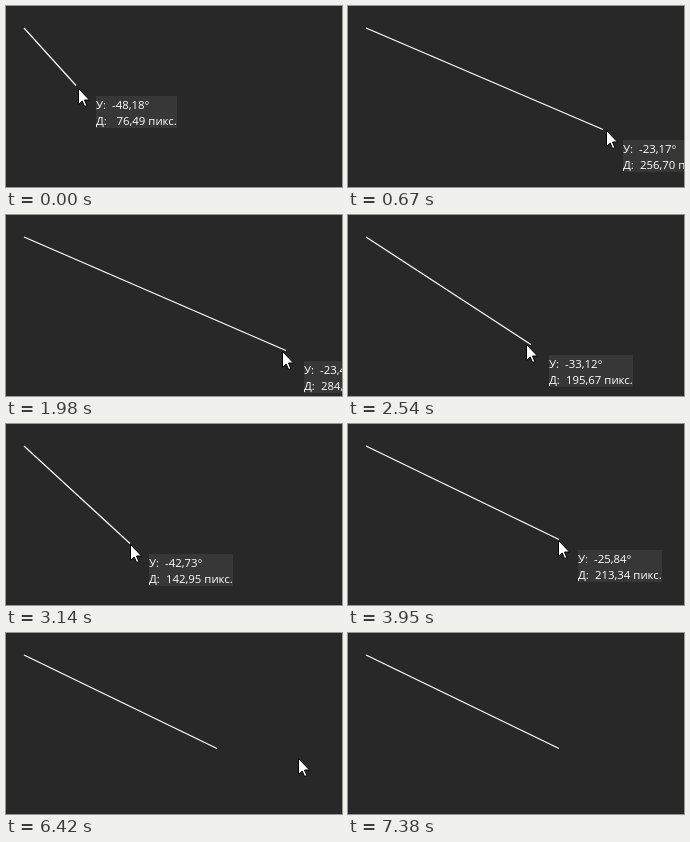
These frames come from a looping animation (336 by 181 pixels, 8120 ms). An HTML page with a canvas:

```html
<!DOCTYPE html>
<html lang="ru">
<head>
<meta charset="utf-8">
<title>Линия</title>
<style>
html, body { margin: 0; width: 100%; height: 100%; overflow: hidden; background: #282828; }
canvas { display: block; }
</style>
</head>
<body>
<canvas id="stage" width="336" height="181"></canvas>
<script>
const ctx = document.getElementById('stage').getContext('2d');
const LOOP = 8120, REFRESH = 50, RELEASE = 4050;
const POINTER_LEAD = 23; // ms by which the pointer runs ahead of the line

// Turning points of the drag; the curve between them is a cubic spline.
const drag = [
  { t: 0, angle: 48.18, length: 76.49 },
  { t: 650, angle: 23.17, length: 256.7 },
  { t: 1300, angle: 23.8, length: 310 },
  { t: 1950, angle: 23.43, length: 284.36 },
  { t: 2550, angle: 34, length: 189 },
  { t: 3100, angle: 42.73, length: 142.95 },
  { t: 3950, angle: 25.84, length: 213.34 }
];

// Moves of the free pointer after the drag.
const glides = [
  { from: RELEASE, to: 4200, x: 205, y: 107 },
  { from: 4600, to: 5300, x: 294, y: 125 },
  { from: 6390, to: 6400, x: 292, y: 125 },
  { from: 7100, to: 7350, x: 322, y: 182 }
];

const clamp = (v, lo, hi) => Math.min(hi, Math.max(lo, v));
const smooth = u => u * u * (3 - 2 * u);

function spline(keys, name, time) {
  const last = keys.length - 1;
  const t = clamp(time, keys[0].t, keys[last].t);
  const i = clamp(keys.findIndex(k => k.t > t) - 1, -2, last - 1);
  if (i < 0) return keys[last][name];
  const a = keys[i], b = keys[i + 1], span = b.t - a.t, u = (t - a.t) / span;
  const tangent = n => {
    const p = keys[Math.max(n - 1, 0)], q = keys[Math.min(n + 1, last)];
    const weight = n === 0 || n === last ? 0.5 : 1;
    return weight * (q[name] - p[name]) / (q.t - p.t);
  };
  return a[name] + (b[name] - a[name]) * smooth(u)
    + span * u * (1 - u) * ((1 - u) * tangent(i) - u * tangent(i + 1));
}

function lineAt(t) {
  const angle = spline(drag, 'angle', t), length = spline(drag, 'length', t);
  const rad = angle * Math.PI / 180;
  return { angle, length, x: 18 + length * Math.cos(rad), y: 22 + length * Math.sin(rad) };
}

function pointerAt(t) {
  const tip = lineAt(t + POINTER_LEAD);
  let x = tip.x, y = tip.y + 1;
  for (const g of glides) {
    const u = smooth(clamp((t - g.from) / (g.to - g.from), 0, 1));
    x += (g.x - x) * u;
    y += (g.y - y) * u;
  }
  return { x, y };
}

const arrow = new Path2D('M.5 .5V16.5L4.2 13L6.6 18.5L8.8 17.6L6.5 12H11.5Z');

function drawPointer({ x, y }) {
  ctx.save();
  ctx.translate(Math.round(x), Math.round(y));
  ctx.fillStyle = '#fff';
  ctx.strokeStyle = '#000';
  ctx.lineWidth = 1;
  ctx.fill(arrow);
  ctx.stroke(arrow);
  ctx.restore();
}

const decimal = n => n.toFixed(2).replace('.', ',');

function drawReadout(x, y, { angle, length }) {
  const short = length < 100;
  ctx.fillStyle = '#373737';
  ctx.fillRect(x, y, short ? 81 : 84, 32);
  ctx.fillStyle = '#fff';
  ctx.font = '500 11.4px "Open Sans", "Noto Sans", sans-serif';
  ctx.fillText('У:', x, y + 13);
  ctx.fillText(`-${decimal(angle)}°`, x + 16, y + 13);
  ctx.fillText('Д:', x, y + 29);
  ctx.fillText(`${decimal(length)} пикс.`, x + (short ? 20.5 : 17), y + 29);
}

function draw(time) {
  const t = Math.floor(time / REFRESH) * REFRESH;
  const line = lineAt(t), pointer = pointerAt(t);

  ctx.fillStyle = '#282828';
  ctx.fillRect(0, 0, 336, 181);

  ctx.strokeStyle = '#fff';
  ctx.lineWidth = 1.15;
  ctx.beginPath();
  ctx.moveTo(18, 22);
  ctx.lineTo(line.x + 1, line.y + 0.5);
  ctx.stroke();

  if (t < RELEASE) {
    const drift = (pointer.x - line.x) * 0.3;
    drawReadout(Math.round(line.x + 20 + drift), Math.round(line.y + 11), line);
  }
  drawPointer(pointer);
}

const begin = performance.now();
function frame() {
  draw((performance.now() - begin) % LOOP);
  requestAnimationFrame(frame);
}
frame();
</script>
</body>
</html>
```
